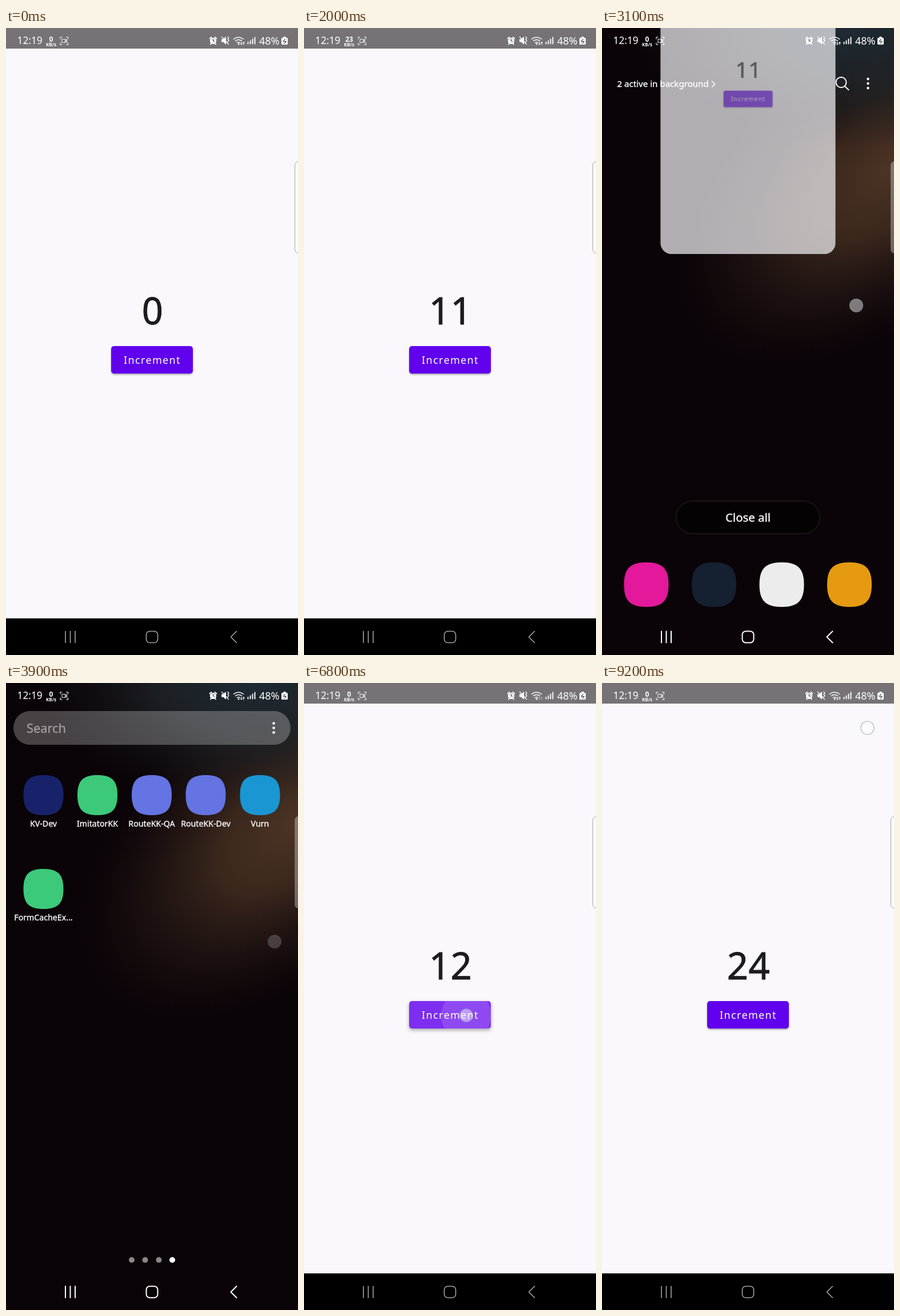
An HTML page that plays this animation: 511 by 1096 pixels, repeating every 9300 ms.

```html
<!DOCTYPE html>
<html lang="en">
<head>
<meta charset="utf-8">
<title>Counter kept across restarts</title>
<style>
  html, body { margin: 0; width: 100%; height: 100%; overflow: hidden; background: #0a0307; }
  svg { display: block; width: 100%; height: 100%; font-family: "Noto Sans", sans-serif; }
  .mid { text-anchor: middle; }
  .line { fill: none; stroke: currentColor; stroke-linecap: round; stroke-linejoin: round; }
  .solid { fill: currentColor; }
  .firm { fill: currentColor; stroke: currentColor; stroke-width: .35; }
  .cut { fill: none; stroke: #3c3a3c; stroke-width: 1.2; }
  .label { font-size: 14.2px; color: #fff; text-anchor: middle; }
</style>
</head>
<body>
<svg viewBox="0 0 511 1096" preserveAspectRatio="none">
  <defs>
    <path id="squircle" d="M0-1C.72-1 1-.72 1 0S.72 1 0 1-1 .72-1 0-.72-1 0-1Z"/>
    <radialGradient id="brown" gradientUnits="userSpaceOnUse" cx="0" cy="0" r="1"
      gradientTransform="translate(505 245) rotate(-40) scale(450 250)">
      <stop offset="0" stop-color="#4c3425"/>
      <stop offset=".35" stop-color="#402b1f" stop-opacity=".9"/>
      <stop offset=".7" stop-color="#2a1c17" stop-opacity=".5"/>
      <stop offset="1" stop-color="#1c1010" stop-opacity="0"/>
    </radialGradient>
    <radialGradient id="blue" gradientUnits="userSpaceOnUse" cx="0" cy="0" r="1"
      gradientTransform="translate(430 0) scale(370 210)">
      <stop offset="0" stop-color="#1f2b34"/>
      <stop offset=".45" stop-color="#1f252a" stop-opacity=".8"/>
      <stop offset="1" stop-color="#17181b" stop-opacity="0"/>
    </radialGradient>
    <clipPath id="cardClip"><rect id="cardShape" width="511" height="1032"/></clipPath>
    <clipPath id="buttonClip"><rect x="184" y="556" width="143" height="48" rx="5"/></clipPath>
    <g id="navShapes">
      <path d="M104 1054.500v20M112.500 1054.500v20M121 1054.500v20"/>
      <rect x="245.500" y="1054.500" width="20" height="20" rx="6"/>
      <path d="M403.500 1054.500l-10 10 10 10"/>
    </g>
  </defs>

  <g id="wallpaper">
    <rect width="511" height="1096" fill="#0a0307"/>
    <rect width="511" height="800" fill="url(#brown)"/>
    <rect width="511" height="300" fill="url(#blue)"/>
  </g>

  <g id="drawer">
    <rect x="13" y="49" width="485" height="59" rx="29" fill="#fff" fill-opacity=".25"/>
    <text class="firm" x="36" y="87" font-size="21.800" color="#a09fa0">Search</text>
    <g fill="#fff">
      <circle cx="468.500" cy="70.500" r="2.300"/><circle cx="468.500" cy="78.500" r="2.300"/><circle cx="468.500" cy="86.500" r="2.300"/>
    </g>
    <g id="apps"></g>
    <g fill="#8c8684">
      <circle cx="220" cy="1008.500" r="5"/><circle cx="243.500" cy="1008.500" r="5"/><circle cx="267.500" cy="1008.500" r="5"/>
      <circle cx="291" cy="1008.500" r="5" fill="#fff"/>
    </g>
  </g>

  <g id="recents">
    <rect x="129.500" y="827" width="252" height="57" rx="28.500" fill="#050204" stroke="#2b282a"/>
    <text class="firm mid" x="255.500" y="863" font-size="20.400" color="#fff">Close all</text>
    <g id="dock"></g>
  </g>

  <g id="app" clip-path="url(#cardClip)">
    <rect width="511" height="1032" fill="#faf8fc"/>
    <g id="content">
      <rect width="511" height="36" fill="#767276"/>
      <text id="count" class="mid" x="256.500" y="518" font-size="65" letter-spacing=".5" fill="#1c1b1f" stroke="#1c1b1f" stroke-width=".9">0</text>
      <rect id="button" x="184" y="556" width="143" height="48" rx="5" fill="#6000ec"/>
      <g clip-path="url(#buttonClip)" fill="#fff">
        <rect id="tint" x="184" y="556" width="143" height="48"/>
        <circle id="ripple" cx="284" cy="581"/>
      </g>
      <text class="mid" x="256" y="586.500" font-size="18" letter-spacing="1.350" fill="#fff">Increment</text>
    </g>
  </g>

  <g id="recentsHeader" color="#fff">
    <text class="firm" x="26.500" y="103" font-size="15.100">2 active in background</text>
    <path class="line" stroke-width="1.600" d="M192.500 93l5 5-5 5"/>
    <circle class="line" stroke-width="2" cx="418.500" cy="95" r="9"/>
    <path class="line" stroke-width="2" d="M425 102l6.500 6"/>
    <circle class="solid" cx="465.500" cy="89" r="2.200"/><circle class="solid" cx="465.500" cy="97" r="2.200"/><circle class="solid" cx="465.500" cy="105" r="2.200"/>
  </g>

  <g id="splash">
    <rect id="splashCard" fill="#faf8fc"/>
    <use id="splashIcon" href="#squircle" fill="#3ddc84"/>
  </g>

  <rect id="navBack" y="1032" width="511" height="64"/>
  <rect id="edge" x="505.500" y="233.500" width="20" height="160" rx="6" fill="#fff" fill-opacity=".32"/>

  <g id="status">
    <text class="solid" x="19.500" y="28" font-size="17.300">12:19</text>
    <text id="speed" class="solid mid" x="79" y="24" font-size="12" font-weight="700">0</text>
    <text class="solid mid" x="79" y="31.500" font-size="8" font-weight="700">KB/s</text>
    <path class="line" stroke-width="1.100" d="M95 19v-3h3M105.500 16h3v3M108.500 26v3h-3M98 29h-3v-3"/>
    <path id="camera" class="line" stroke-width="1.100" d="M98 19.500h5.500v6H98zM103.500 22l3-2v5l-3-2"/>
    <circle class="solid" cx="362.500" cy="22.500" r="5.600"/>
    <path class="line" stroke-width="1.900" d="M356.500 18.500l3-2.500M368.500 18.500l-3-2.500M359 27l-1 1.500M366 27l1 1.500"/>
    <path class="cut" d="M362.500 19v4h3"/>
    <path class="solid" d="M377 19.500h3l5-4.500v14l-5-4.500h-3z"/>
    <path class="line" stroke-width="1.300" d="M377.500 15.500l12 13M388 15.500l2 2-2 2.500 2 2-2 2.500"/>
    <path class="line" stroke-width="1.500" d="M398.500 19.500a12.500 12.500 0 0 1 17 0M401.500 22.500a8.500 8.500 0 0 1 11 0M404.500 25.500a4.500 4.500 0 0 1 5 0"/>
    <circle class="solid" cx="407" cy="28" r="1.500"/>
    <path id="traffic" class="line" stroke-width="1.100" d="M412 24.500v4.500l-1.200-1.300M412 29l1.200-1.300M416 29v-4.500l-1.200 1.300M416 24.500l1.200 1.300"/>
    <path class="line" stroke-width="1.900" d="M423.500 27.500v-2.500M427.500 27.500v-5M431.500 27.500v-8M435.500 27.500v-11"/>
    <text class="solid" x="443" y="28.500" font-size="18">48%</text>
    <path class="solid" d="M485.500 17v-2h4v2h2q1.500 0 1.500 1.500v9q0 1.500-1.500 1.500h-8q-1.500 0-1.500-1.500v-9q0-1.500 1.500-1.500z"/>
    <path class="cut" d="M488.500 19l-3 4.500h4.500l-3 4"/>
  </g>

  <use id="nav" class="line" href="#navShapes"/>
  <use id="navCore" class="line" href="#navShapes" color="#120c10" stroke-width="2"/>

  <circle id="pointer" r="11.500" fill="#fff" fill-opacity=".45" stroke="#8296aa" stroke-opacity=".75" stroke-width="1.200"/>
</svg>

<script>
const LOOP = 9300, STEP = 100, PRESS = 90;
const RUNS = [
  { start: 250, gap: 155, taps: 11 },
  { start: 6600, gap: 170, taps: 13 }
];

const el = Object.fromEntries([...document.querySelectorAll("[id]")].map(n => [n.id, n]));
const set = (node, attrs) => { for (const k in attrs) node.setAttribute(k, attrs[k]); };
const clamp = (v, lo = 0, hi = 1) => Math.min(hi, Math.max(lo, v));
const ramp = (t, from, to) => clamp((t - from) / (to - from));
const lerp = (a, b, k) => a + (b - a) * k;
const easeOut = k => 1 - (1 - k) ** 3;
const within = (t, from, to) => t >= from && t < to;

const icon = (x, y, r, color, label = "") =>
  `<use href="#squircle" transform="translate(${x} ${y}) scale(${r})" fill="${color}"/>` +
  (label && `<text class="label firm" x="${x}" y="${y + 55}">${label}</text>`);

el.apps.innerHTML =
  icon(65.5, 196, 35, "#18226a", "KV-Dev") +
  icon(160, 196, 35, "#3cc97a", "ImitatorKK") +
  icon(255, 196, 35, "#6474e2", "RouteKK-QA") +
  icon(349.5, 196, 35, "#6474e2", "RouteKK-Dev") +
  icon(444.5, 196, 35, "#1a96d2", "Vurn") +
  icon(65.5, 360, 35, "#3cc97a", "FormCacheEx...");
el.dock.innerHTML = ["#e3189b", "#152030", "#ececec", "#e59a12"]
  .map((color, i) => icon(77.5 + 118.5 * i, 973, 39, color)).join("");

const countAt = t => RUNS.reduce((sum, r) =>
  sum + clamp(Math.floor((t - r.start - PRESS) / r.gap) + 1, 0, r.taps), 0);

// Time since the latest press, and how much of the pressed look remains.
function touchAt(t) {
  const run = RUNS.filter(r => t >= r.start).pop();
  if (!run) return { age: Infinity, held: 0 };
  const index = Math.min(run.taps - 1, Math.floor((t - run.start) / run.gap));
  const age = t - run.start - index * run.gap;
  return { age, held: index < run.taps - 1 ? 1 : 1 - ramp(age, PRESS, 200) };
}

function pointerAt(t, age) {
  if (age < PRESS) return [284, 581, 1];
  if (within(t, 2400, 2500)) return [113, 1064, 1];
  if (within(t, 2800, 4100)) {
    const drag = ramp(t, 2800, 3100), drift = easeOut(ramp(t, 3100, 3500));
    return [lerp(405, 445, drag) + 25 * drift, lerp(700, 485, drag) - 33 * drift, 1 - ramp(t, 3700, 4050)];
  }
  if (within(t, 5000, 5100)) return [65, 360, 1];
  if (t >= 9200) return [464.5, 78.5, 1];
  return [0, 0, 0];
}

function drawCounter(t, touch) {
  el.count.textContent = countAt(t);
  set(el.tint, { opacity: .18 * touch.held });
  set(el.ripple, {
    r: touch.held ? 30 + .47 * touch.age : 0,
    opacity: .13 * (1 - ramp(touch.age, PRESS, 180))
  });
  el.button.style.filter =
    `drop-shadow(0 ${2 + touch.held}px ${1.5 + 1.5 * touch.held}px rgba(0,0,0,.32))`;
}

function drawCard(t) {
  const back = t >= 5800;
  const shrink = back ? 0 : easeOut(ramp(t, 2350, 2750));
  const fling = back ? 0 : Math.max(0, (t - 2800) / 300);
  const scale = lerp(1, .6, shrink);
  const y = 165 * shrink - 389 * fling ** 1.5;
  set(el.app, {
    transform: `translate(${255.5 * (1 - scale)} ${y}) scale(${scale})`,
    opacity: back ? 1 : clamp(1 - .3 * fling ** 2),
    display: t < 3300 || back ? "inline" : "none"
  });
  set(el.content, { opacity: clamp(1 - .4 * fling ** 2) });
  set(el.cardShape, { rx: 33 * shrink });
}

function drawLauncher(t) {
  const recents = ramp(t, 2450, 2750) * (1 - ramp(t, 3250, 3450));
  set(el.recents, { opacity: recents });
  set(el.recentsHeader, { opacity: recents });

  const launch = easeOut(ramp(t, 5050, 5605));
  const shown = easeOut(ramp(t, 3300, 3650));
  const scale = lerp(.94, 1, shown) - .0745 * launch;
  set(el.drawer, {
    opacity: shown,
    transform: `translate(255.5 548) scale(${scale}) translate(-255.5 -548)`,
    display: t < 5700 ? "inline" : "none"
  });

  const left = 30 * (1 - launch), right = lerp(100, 511, launch);
  const top = lerp(298, 0, launch), bottom = lerp(453, 1096, launch);
  set(el.splashCard, {
    x: left, y: top, width: right - left, height: bottom - top,
    rx: launch < 1 ? lerp(30, 42, launch) : 0
  });
  set(el.splashIcon, {
    transform: `translate(${(left + right) / 2} ${(top + bottom) / 2}) scale(${lerp(35, 100, launch)})`
  });
  set(el.splash, {
    opacity: 1 - ramp(t, 5750, 5950),
    display: within(t, 5060, 5950) ? "inline" : "none"
  });
}

function drawSystem(t) {
  const inApp = t < 2400 || t >= 5600;
  const dimmed = within(t, 5150, 5800);
  const outlined = within(t, 5150, 5600);
  set(el.navBack, { opacity: t < 2400 ? 1 : ramp(t, 5500, 5700) });
  set(el.nav, {
    color: outlined ? "#484547" : inApp ? "#a3a1a3" : "#fff",
    "stroke-width": outlined ? 4.5 : inApp ? 1.6 : 2
  });
  set(el.navCore, { opacity: +outlined });
  set(el.status, { color: dimmed ? "#646264" : "#fff" });
  set(el.edge, { stroke: "#9c9a9c", "stroke-opacity": inApp ? .9 : .35 });
  set(el.camera, { opacity: within(t % 1200, 400, 600) ? 0 : .9 });
  set(el.traffic, { opacity: within(t, 5000, 7000) ? .4 : 1 });
  el.speed.textContent = within(t, 1200, 2900) ? 23 : 0;
}

function draw(t) {
  const touch = touchAt(t);
  drawCounter(t, touch);
  drawCard(t);
  drawLauncher(t);
  drawSystem(t);
  const [cx, cy, opacity] = pointerAt(t, touch.age);
  set(el.pointer, { cx, cy, opacity });
}

function tick() {
  let t = Math.floor(performance.now() % LOOP / STEP) * STEP;
  if (within(t, 8800, 9200)) t = 8800;
  draw(t);
  requestAnimationFrame(tick);
}
tick();
</script>
</body>
</html>
```
